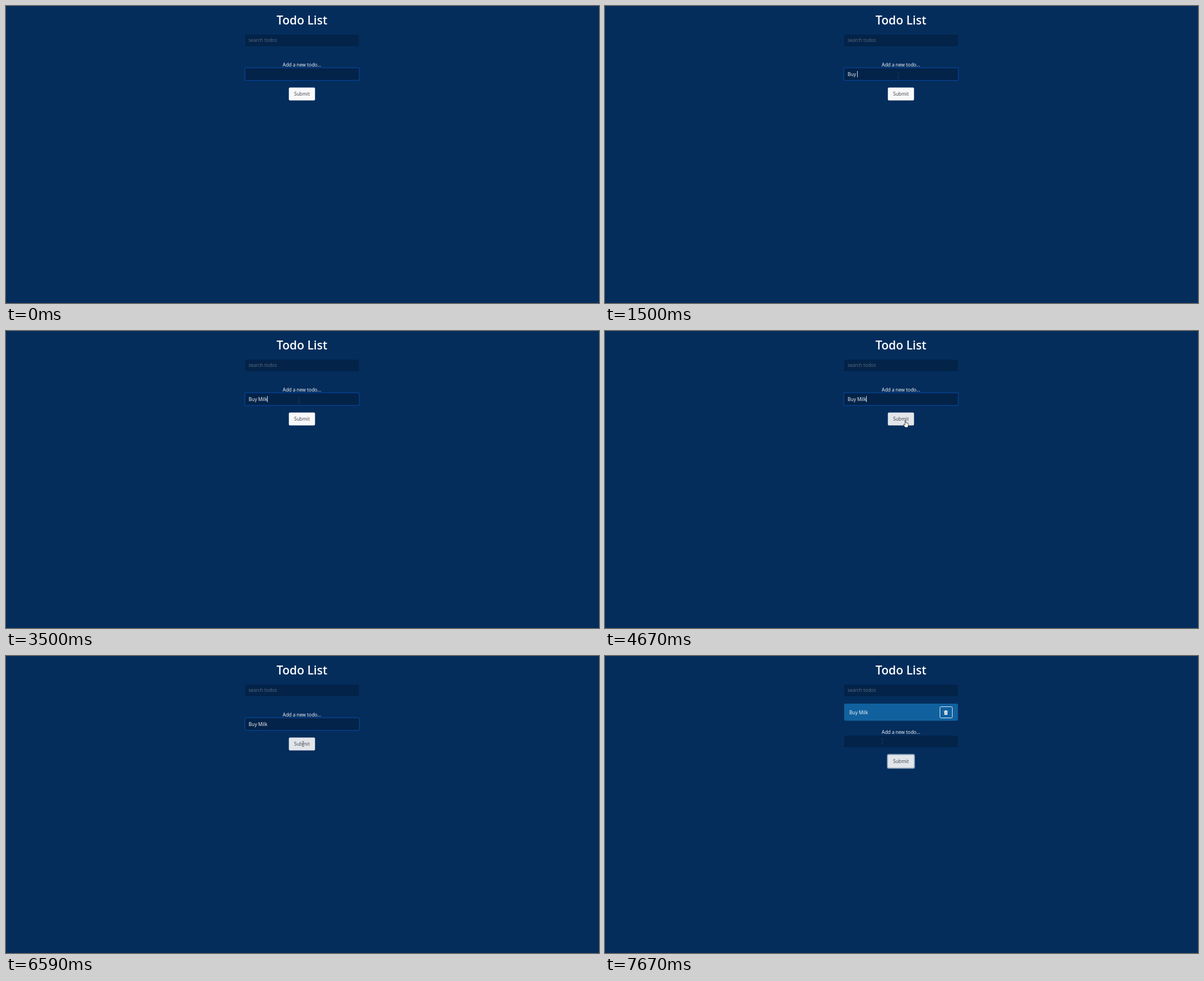
Animation of 1056x530 px, one loop 8 s. Source, as an HTML page with a canvas:

```html
<!DOCTYPE html>
<html lang="en">
<head>
<meta charset="utf-8">
<title>Todo List</title>
<style>
  html, body { margin: 0; width: 100%; height: 100%; overflow: hidden; background: #042d5c; }
  canvas { display: block; }
</style>
</head>
<body>
<canvas id="stage" width="1056" height="530"></canvas>
<script>
const ctx = document.getElementById('stage').getContext('2d');
const LOOP = 8000;
const BLINK = 530;
const POINTER_SHOWN = 150;
const BLUR_AT = 6650;   // focus moves from the field to the button
const ADD_AT = 6830;    // the new item appears
const SHAPE_LAG = 120;  // the pointer's shape trails its position
const WORDS = [
  { text: 'Buy ', start: 830, step: 215 },
  { text: 'Milk', start: 2180, step: 430 }
];
const TODO = WORDS.map(w => w.text).join('');
const MOVES = [
  { start: 3920, end: 4290, x: 535, y: 160 },
  { start: 5250, end: 5470, x: 527, y: 99 },
  { start: 5920, end: 6590, x: 529, y: 157 },
  { start: 6830, end: 7150, x: 520, y: 200 },
  { start: 7150, end: 7540, x: 494, y: 152 }
];

const clamp = v => Math.min(1, Math.max(0, v));

function pointerAt(t) {
  return MOVES.reduce((from, move) => {
    const k = clamp((t - move.start) / (move.end - move.start)) ** 3;
    return { x: from.x + (move.x - from.x) * k, y: from.y + (move.y - from.y) * k };
  }, { x: 522, y: 124 });
}

function typedAt(t) {
  let text = '', lastKey = 480;
  for (const word of WORDS) {
    const count = Math.min(word.text.length, Math.floor((t - word.start) / word.step) + 1);
    if (count <= 0) break;
    text += word.text.slice(0, count);
    lastKey = word.start + (count - 1) * word.step;
  }
  return { text, lastKey };
}

const inside = (p, r) => p.x >= r.x && p.x <= r.x + r.w && p.y >= r.y && p.y <= r.y + r.h;
const fieldRect = y => ({ x: 426, y, w: 202.5, h: 21 });
const grow = (r, d) => ({ x: r.x - d, y: r.y - d, w: r.w + 2 * d, h: r.h + 2 * d });

function box(r, fill, stroke, lineWidth = 1) {
  ctx.beginPath();
  ctx.roundRect(r.x, r.y, r.w, r.h, 2);
  if (fill) { ctx.fillStyle = fill; ctx.fill(); }
  if (stroke) { ctx.strokeStyle = stroke; ctx.lineWidth = lineWidth; ctx.stroke(); }
}

function label(text, x, y, color = '#fff', align = 'left', font = '8.45px') {
  ctx.font = font + ' "Open Sans", "Noto Sans", sans-serif';
  ctx.textAlign = align;
  ctx.fillStyle = color;
  ctx.fillText(text, x, y);
}

function shape(d, x, y, fill, stroke, lineWidth = .8) {
  const path = new Path2D(d);
  ctx.save();
  ctx.translate(x, y);
  if (fill) { ctx.fillStyle = fill; ctx.fill(path); }
  if (stroke) { ctx.strokeStyle = stroke; ctx.lineWidth = lineWidth; ctx.stroke(path); }
  ctx.restore();
}

function field(rect, focused) {
  if (focused) box(grow(rect, .5), null, '#07408c', 1.8);
  box(rect, '#032349');
}

function todoItem() {
  box({ x: 426, y: 85, w: 202.5, h: 30.5 }, '#11619f');
  label(TODO, 435, 103.7);
  box({ x: 596.5, y: 90.5, w: 22, h: 20 }, null, '#dfeaf3');
  shape('M-3.5-3h7v1h-7zM-1.3-4h2.6v1h-2.6zM-3-1.5h6L2.5 4h-5z', 607, 101, '#fff');
  shape('M-1.2-.5v3.5M0-.5v3.5M1.2-.5v3.5', 607, 101, null, '#11619f', .4);
}

function caret({ text, lastKey }, t) {
  if (t < lastKey || Math.floor((t - lastKey) / BLINK) % 2) return;
  ctx.fillStyle = '#d5dde6';
  ctx.fillRect(Math.round(431.5 + ctx.measureText(text).width), 116, 1, 11);
}

function pointer(t, entry, button) {
  const { x, y } = pointerAt(t), trail = pointerAt(t - SHAPE_LAG);
  if (inside(trail, entry)) {
    const color = inside({ x, y }, button) ? '#555' : '#1f3f52';
    shape('M-2-4.5h1.4L0-4l.6-.5H2M0-4v8M-2 4.5h1.4L0 4l.6.5H2', x, y, null, color);
  } else if (inside(trail, button)) {
    shape('M-.8 0Q0-1 .8 0V4L2 3.7 3 4.3 4 4.2 5 5V9L4 12H-.5L-3.3 8Q-4 6.5-2.7 6.5L-.8 8Z',
      x, y, '#fff', '#222');
  } else {
    shape('M0 0V10L2.3 7.8 3.8 11.2 5.3 10.5 3.8 7.3H7Z', x, y, '#fff', '#222', .6);
  }
}

function draw(t) {
  const added = t >= ADD_AT, focused = t < BLUR_AT;
  const shift = added ? 31 : 0;
  const entry = fieldRect(111 + shift);
  const button = { x: 503.7, y: 145.5 + shift, w: 46.6, h: 23 };

  ctx.fillStyle = '#042d5c';
  ctx.fillRect(0, 0, 1056, 530);
  label('Todo List', 527, 33, '#fff', 'center', '600 21px');
  field(fieldRect(51), false);
  label('search todos', 432, 64.4, '#5f6d7d');

  if (added) todoItem();
  label('Add a new todo...', 527, 108 + shift, '#fff', 'center');
  field(entry, focused);
  if (!added) {
    const typed = typedAt(t);
    label(typed.text, 432, 125);
    if (focused) caret(typed, t);
  }

  const active = !focused || inside(pointerAt(t), button);
  if (!focused) box(grow(button, .5), null, '#8297b2', 2.4);
  box(button, active ? '#e2e6ea' : '#f8f9fa');
  label('Submit', 527, 160 + shift, '#3b3f43', 'center');

  if (t >= POINTER_SHOWN) pointer(t, entry, button);
}

const start = performance.now();
function tick() {
  draw((performance.now() - start) % LOOP);
  requestAnimationFrame(tick);
}
tick();
</script>
</body>
</html>
```
